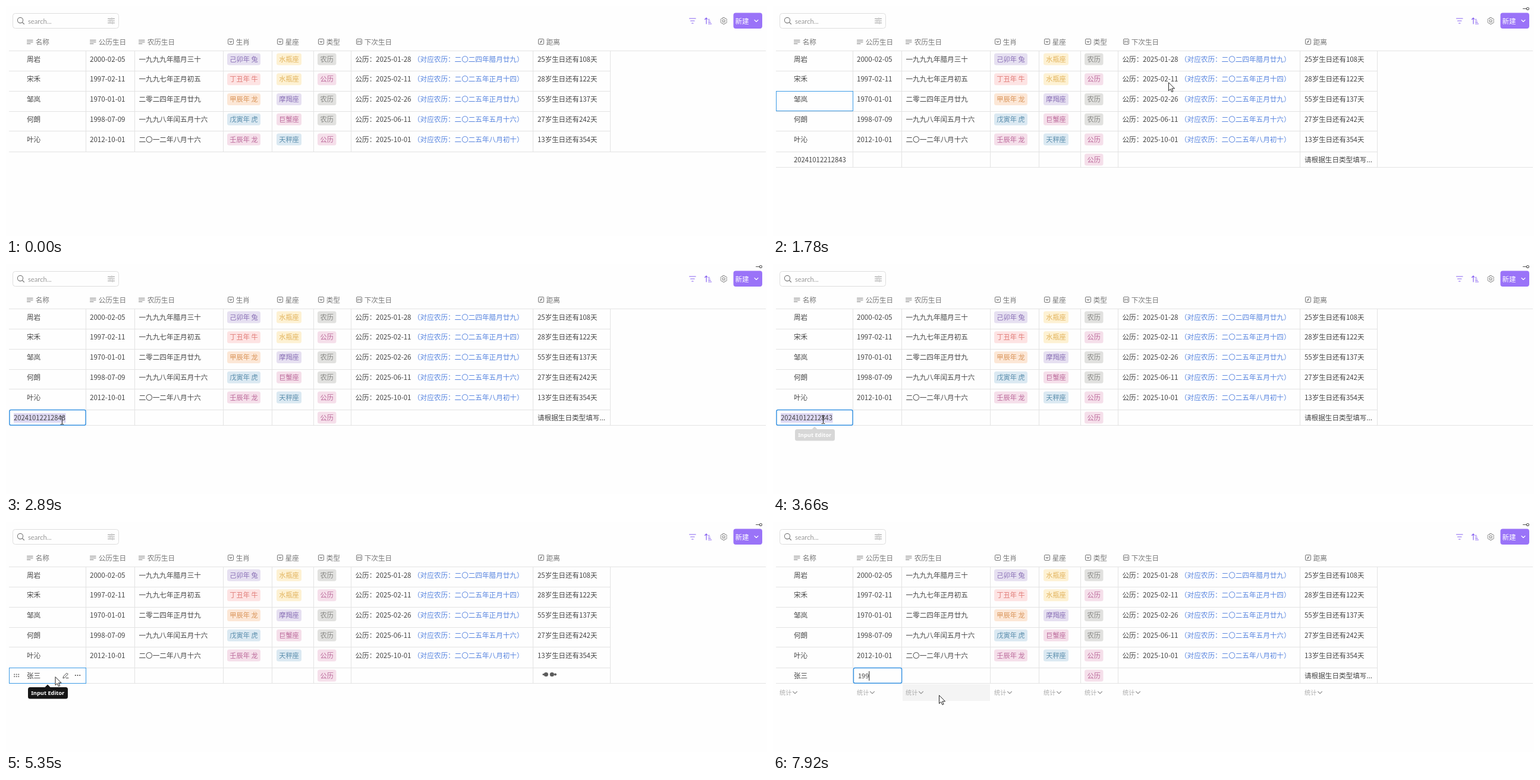
An HTML page for the animation above (8 s loop, 1280 px wide and 387 px high).

```html
<!DOCTYPE html>
<html lang="zh-CN">
<head>
<meta charset="utf-8">
<title>生日表</title>
<style>
html, body { margin: 0; width: 100%; height: 100%; overflow: hidden; background: #fefefe; }
svg { display: block; width: 1280px; height: 387px; }
text { font-family: "Noto Sans CJK SC", "Noto Sans CJK", "Noto Sans", sans-serif; white-space: pre; }
.latin { font-family: "Noto Sans", sans-serif; }
.narrow { font-family: Lato, sans-serif; }
</style>
</head>
<body>
<svg viewBox="0 0 1280 387"><g id="base"></g><g id="live"></g></svg>
<script>
const LOOP = 8000;
const INK = '#444', GRAY = '#757575', LINE = '#e3e3e3', BLUE = '#3c9be6', PURPLE = '#9a73f8';

// Drawing helpers: each returns SVG markup
const text = (x, y, s, fill = INK, size = 11.6, more = '') =>
  `<text x="${x}" y="${y}" fill="${fill}" font-size="${size}" ${more}>${s}</text>`;
const rect = (x, y, w, h, fill, r = 0, more = '') =>
  `<rect x="${x}" y="${y}" width="${w}" height="${h}" fill="${fill}" rx="${r}" ${more}/>`;
const frame = (x, y, w, h, color, width = 1, r = 0) =>
  rect(x, y, w, h, 'none', r, `stroke="${color}" stroke-width="${width}"`);
const path = (d, stroke, width = 1, fill = 'none') =>
  `<path d="${d}" fill="${fill}" stroke="${stroke}" stroke-width="${width}" stroke-linecap="round" stroke-linejoin="round"/>`;
const dot = (x, y, r, fill) => `<circle cx="${x}" cy="${y}" r="${r}" fill="${fill}"/>`;
const ring = (x, y, r, color) => `<circle cx="${x}" cy="${y}" r="${r}" fill="none" stroke="${color}" stroke-width="1.1"/>`;
const at = (x, y, s) => `<g transform="translate(${x.toFixed(2)} ${y.toFixed(2)})">${s}</g>`;
const middle = 'text-anchor="middle"';
const chevron = (x, y, color, r = 3) => path(`M${x - r} ${y - r / 2}l${r} ${r} ${r}-${r}`, color, 1.1);

const TAGS = {
  purple: ['#e6e0f1', '#8a70b6'], red: ['#fde3e3', '#e07a76'], orange: ['#fce7d6', '#d99459'],
  blue: ['#dbe9f2', '#5a8dac'], pink: ['#f5dfea', '#bb699a'], yellow: ['#fdf1d3', '#e2b35c'],
  gray: ['#e1e1df', '#868683']
};
const tag = (x, y, w, s, color) =>
  rect(x, y - 10, w, 20, TAGS[color][0], 3.5) + text(x + w / 2, y + 4.1, s, TAGS[color][1], 11.2, middle);

// Table geometry
const EDGES = [134, 216, 365, 447, 517, 580, 886, 1016];
const ROW_LINES = [109, 143, 177, 210];
const rowY = i => 89.4 + 33.8 * i;
const HEADERS = [
  ['text', 35, '名称'], ['text', 141, '公历生日'], ['text', 223, '农历生日'], ['pick', 372, '生肖'],
  ['pick', 455, '星座'], ['pick', 524, '类型'], ['M', 588, '下次生日'], ['f', 894, '距离']
];
const ROWS = [
  ['周岩', '2000-02-05', '一九九九年腊月三十', '己卯年 兔', 'purple', '水瓶座', 'yellow', 0, '2025-01-28', '二〇二四年腊月廿九', '25岁生日还有108天'],
  ['宋禾', '1997-02-11', '一九九七年正月初五', '丁丑年 牛', 'red', '水瓶座', 'yellow', 1, '2025-02-11', '二〇二五年正月十四', '28岁生日还有122天'],
  ['邹岚', '1970-01-01', '二零二四年正月廿九', '甲辰年 龙', 'orange', '摩羯座', 'purple', 0, '2025-02-26', '二〇二五年正月廿九', '55岁生日还有137天'],
  ['何朗', '1998-07-09', '一九九八年闰五月十六', '戊寅年 虎', 'blue', '巨蟹座', 'pink', 0, '2025-06-11', '二〇二五年五月十六', '27岁生日还有242天'],
  ['叶沁', '2012-10-01', '二〇一二年八月十六', '壬辰年 龙', 'pink', '天秤座', 'blue', 1, '2025-10-01', '二〇二五年八月初十', '13岁生日还有354天']
];

const kindTag = (y, solar) => tag(524, y, 31.5, solar ? '公历' : '农历', solar ? 'pink' : 'gray');

function fieldIcon(kind, x) {
  if (kind === 'text') return path(`M${x + .5} 57.5h9.5m-9.5 3h9.5m-9.5 3h5.5`, GRAY, 1.2);
  const inside = kind === 'pick' ? chevron(x + 6, 60.2, GRAY, 1.9)
    : kind === 'M' ? path(`M${x + 3.8} 62.2v-4l2.2 2.2 2.2-2.2v4`, GRAY)
    : path(`M${x + 4} 62.5q1.500 0 2-2.500t2-2.500m-3.500 2.500h3`, GRAY);
  return frame(x + 1.5, 55.5, 9, 9, GRAY, 1, 1.5) + inside;
}

function toolbar() {
  return frame(11.5, 12.5, 178, 25, '#dedede', 1, 4) +
    ring(24, 24, 4.6, '#777') + path('M27.5 27.5l3 3', '#777', 1.1) +
    text(37, 29.5, 'search...', '#999', 11.2, 'class="narrow"') +
    path('M171.5 21.5h5m3 0h3M171.5 25h2m3 0h6M171.5 28.5h6m3 0h2M178 20v3M175 23.5v3M179 27v3', '#999') +
    path('M1149.5 21h10.5M1151.5 25h6.5M1153.5 29h2.5', '#8560f0', 1.2) +
    path('M1178 30V20l-2.5 2.5M1178 20l1.5 2M1181.5 22.5h1.5M1181.5 25h2.5M1181.5 27.5h3.5M1181.5 30h5', '#8560f0', 1.2) +
    path('M1206 19.5h2.5l.7 1.7 1.9-.2 1.5 2.3-1 1.7 1 1.7-1.5 2.3-1.9-.2-.7 1.7h-2.5l-.7-1.7-1.9.2-1.5-2.3 1-1.7-1-1.7 1.5-2.3 1.9.2z', '#888') +
    ring(1207.2, 25, 2, '#888');
}

function table() {
  let s = rect(5, 75, 1273, 1, LINE);
  for (const y of ROW_LINES) s += rect(5, y, 1011, 1, LINE);
  for (const x of EDGES) s += rect(x, 75, 1, 170, LINE);
  for (const [kind, x, label] of HEADERS) s += fieldIcon(kind, x) + text(x + 14.7, 64.6, label, GRAY);
  ROWS.forEach(([name, date, lunar, year, yearColor, sign, signColor, solar, next, nextLunar, left], i) => {
    const y = rowY(i), b = y + 4.2;
    s += text(35, b, name) + text(141, b, date) + text(223.5, b, lunar) +
      tag(372, y, 56, year, yearColor) + tag(455, y, 42, sign, signColor) + kindTag(y, solar) +
      text(587.5, b, '公历：') + text(622, b, next) +
      text(685, b, `（对应农历：${nextLunar}）`, '#5583df') + text(894, b, left, INK, 11.45);
  });
  return s;
}

// Pointer: key points joined by eased moves
const MOVES = [
  [470, 968, 358], [1040, 1236, 25], [1460, 1236, 25], [2070, 178, 218], [2110, 178, 218],
  [2300, 109, 257], [2330, 109, 257], [2400, 107, 265], [2540, 107, 265], [3190, 84.5, 262],
  [5090, 84.5, 262], [5091, 83, 261], [5910, 83, 261], [6080, 190, 222], [6260, 338, 240],
  [6430, 290, 258], [6660, 290, 258], [7140, 279.5, 292], [LOOP, 279.5, 292]
];
const clamp = v => Math.max(0, Math.min(1, v));
function pointer(t) {
  const i = MOVES.findIndex(m => m[0] > t);
  const [t0, x0, y0] = MOVES[i - 1], [t1, x1, y1] = MOVES[i];
  const p = (t - t0) / (t1 - t0), e = p * p * (3 - 2 * p);
  return [x0 + (x1 - x0) * e, y0 + (y1 - y0) * e];
}
const SHAPES = {
  arrow: path('M0 0V13.5l3.2-2.9 2.2 4.9 2.2-1-2.2-4.7h4.3z', '#222', 1, '#fff'),
  hand: path('M-1.5 11V1.5a1.5 1.5 0 0 1 3 0V7q0-1 1.4-1t1.5 1.2q.3-.8 1.3-.7t1.3 1.3q.3-.6 1.1-.5t1.2 1.4V13q0 2-1.5 4v2h-7v-1.5q-2-2-5-6.5q-.6-1.5 .6-1.9q1.2-.1 3 2.3zM3 11v4M5 11v4M7 11v4', '#222', 1, '#fff'),
  beam: path('M-2.5-6.5h1.5q1 0 1 1q0-1 1-1h1.5M0-5.5V5.5M-2.5 6.5h1.5q1 0 1-1q0 1 1 1h1.5', '#222')
};
function shapeAt(t) {
  if (t > 950 && t < 1520 || t > 2240 && t < 2800) return 'hand';
  return t >= 2800 && t < 5090 ? 'beam' : 'arrow';
}

// Pieces that come and go
function button(hover) {
  return rect(1223.5, 11.5, 48.5, 26.5, PURPLE, 4) + (hover ? rect(1223.5, 11.5, 28.5, 26.5, '#b096fa', 4) : '') +
    text(1226.5, 29.5, '新建', '#fff') + chevron(1262, 25, '#fff');
}

function tools(hover, gripColor) {
  let s = rect(91, 247, 41, 22, '#fefefe');
  if (hover) s += rect(90, 248, 20, 20, '#ececec', 4);
  s += path('M96 262.5l.6-2.7 5.7-5.7 2 2-5.7 5.7zM101 262.5h4', '#444');
  for (let i = 0; i < 3; i++) {
    s += dot(116.8 + 3.7 * i, 258, 1, '#444');
    for (const y of [256.5, 260]) s += dot(14.2 + 3.5 * i, y, 1, gripColor);
  }
  return s;
}

function loader(t) {
  // cubic-bezier(0, 1, 1, 0)
  const p = (t / 600) % 1, u = .5 - Math.sin(Math.asin(1 - 2 * p) / 3);
  const e = 3 * u * (1 - u) ** 2 + u ** 3, c = '#5c5c5c';
  return dot(904, 256.5, 3.6 * e, c) + dot(904 + 10 * e, 256.5, 3.6, c) +
    dot(914 + 10 * e, 256.5, 3.6, c) + dot(924, 256.5, 3.6 * (1 - e), c);
}

const editor = (x, w, s, caretX) =>
  rect(x, 245, w, 26.5, '#fefefe') + frame(x + .9, 245.4, w - 1.3, 25.8, '#3a94e2', 1.5, 2.5) +
  s + (caretX ? rect(caretX, 251, 1, 16, '#222') : '');

const tooltip = opacity => `<g opacity="${opacity.toFixed(3)}">` +
  `<path d="M65 278.5l5-5 5 5z" fill="#161616"/>` + rect(37, 278, 67, 19.5, '#161616', 3.5) +
  text(70.3, 291.3, 'Input Editor', '#fff', 9.3, middle + ' class="latin" font-weight="700"') + '</g>';

// Input method stages: start, typed keys, first choice, further choices
const STAGES = [
  [4130, 'v', '在', ['中', '着', '这个', '只', '主', '种', '正', '知道']],
  [4180, 'vh', '张', ['章', '涨', '长', '掌']],
  [4320, 'vh s', '张是', ['张', '涨', '长', '章']],
  [4410, 'vh sj', '张三', ['张', '涨', '长', '章']]
];
const HINTS = ['gi', 'di', 'pn', 'lu'];
function inputPanel(t) {
  const [, keys, first, others] = STAGES.filter(g => g[0] <= t).pop();
  let x = 76.5, s = '';
  others.forEach((word, i) => {
    const w = 15 * word.length;
    s += text(x, 319, i + 2, '#555', 15) + text(x + 11.5, 319, word, '#444', 15, 'font-weight="700"') +
      text(x + 15 + w, 318, `(${HINTS[i % 4]})`, '#888', 11.5, 'class="latin"');
    x += 42 + w;
  });
  const tip = 29 + 7 * keys.length;
  return rect(20, 269, x - 24, 61, '#fff') + text(27, 293, keys, '#555', 16, 'class="latin"') +
    path(`M${tip} 293.5l2.3-2.5 2.3 2.5`, '#444') +
    rect(23.5, 300.5, 19 + 15 * first.length, 28, '#0bb17a', 8.5) +
    text(27, 319, '1', '#5fd0aa', 15) + text(38, 319, first, '#fff', 15, 'font-weight="500"') + s;
}

function footer() {
  return rect(218, 273, 147, 28, '#f4f4f4') + HEADERS.map(([kind, x], i) => {
    const left = i ? x : 11;
    return text(left, 291, '统计', '#aaa', 10.2) + chevron(left + 26, 287, '#999', 3.5);
  }).join('');
}

function newRow(t) {
  const editing = t >= 2800 && t < 5090;
  const hovered = t >= 2200 && t < 2800 || t >= 5090 && t < 5980;
  let s = rect(5, 245, 1011, 1, LINE) + rect(5, 271, 1273, 1, LINE);
  for (const x of EDGES) s += rect(x, 245, 1, 27, LINE);
  s += kindTag(258.5, 1);
  s += t >= 5250 && t < 5630 ? loader(t - 5260) : text(894, 262.6, '请根据生日类型填写...');
  if (!editing) {
    s += t < 2800 ? text(35, 262.6, '20241012212843', INK, 11.3) : text(35, 262.6, '张三');
    if (hovered) s += tools(t < 2800, t < 2800 ? '#c8c8c8' : '#666');
    if (t >= 5090 && t < 6200) s += frame(5.5, 245.5, 129, 26, BLUE);
  } else if (t < 4130) {
    s += editor(5, 129.5, rect(13, 251, 87.5, 16, '#ddd8f2') + text(13, 263, '20241012212843', INK, 11.2));
  } else if (t < 4600) {
    s += editor(5, 129.5, rect(13, 266, 3, 1, '#222'), 15.5);
  } else {
    s += editor(5, 129.5, text(13, 263, '张三'), 37);
  }
  if (t >= 6200 && t < 7000) s += frame(134.5, 245.5, 82, 26, BLUE);
  if (t >= 7000) {
    const n = (t >= 7470) + (t >= 7720) + (t >= 7920);
    s += editor(134.5, 82.5, text(143, 263, '199'.slice(0, n), INK, 11), 143 + 6.1 * n);
  }
  return s;
}

function scene(t) {
  let s = button(t >= 950 && t < 1520);
  if (t >= 470) s += path('M1261.5 4.5h6', '#555') + ring(1269.5, 4.5, 2, '#555');
  s += t >= 1600 ? newRow(t) : rect(5, 245, 1273, 1, LINE);
  if (t >= 1600 && t < 2800) s += frame(5.5, 143.5, 129, 33, BLUE);
  if (t >= 3660 && t < 6080) s += tooltip(t < 5910 ? .16 + .84 * clamp((t - 3660) / 230) : 1 - clamp((t - 5910) / 170));
  if (t >= 4130 && t < 4600) s += inputPanel(t);
  if (t >= 6900) s += footer();
  if (t >= 470) s += at(...pointer(t), SHAPES[shapeAt(t)]);
  return s;
}

const live = document.getElementById('live');
document.getElementById('base').innerHTML = toolbar() + table();
let shown = '';
function draw(now) {
  const s = scene(now % LOOP);
  if (s !== shown) live.innerHTML = shown = s;
}
const begin = performance.now();
function tick() {
  draw(performance.now() - begin);
  requestAnimationFrame(tick);
}
tick();
</script>
</body>
</html>
```
